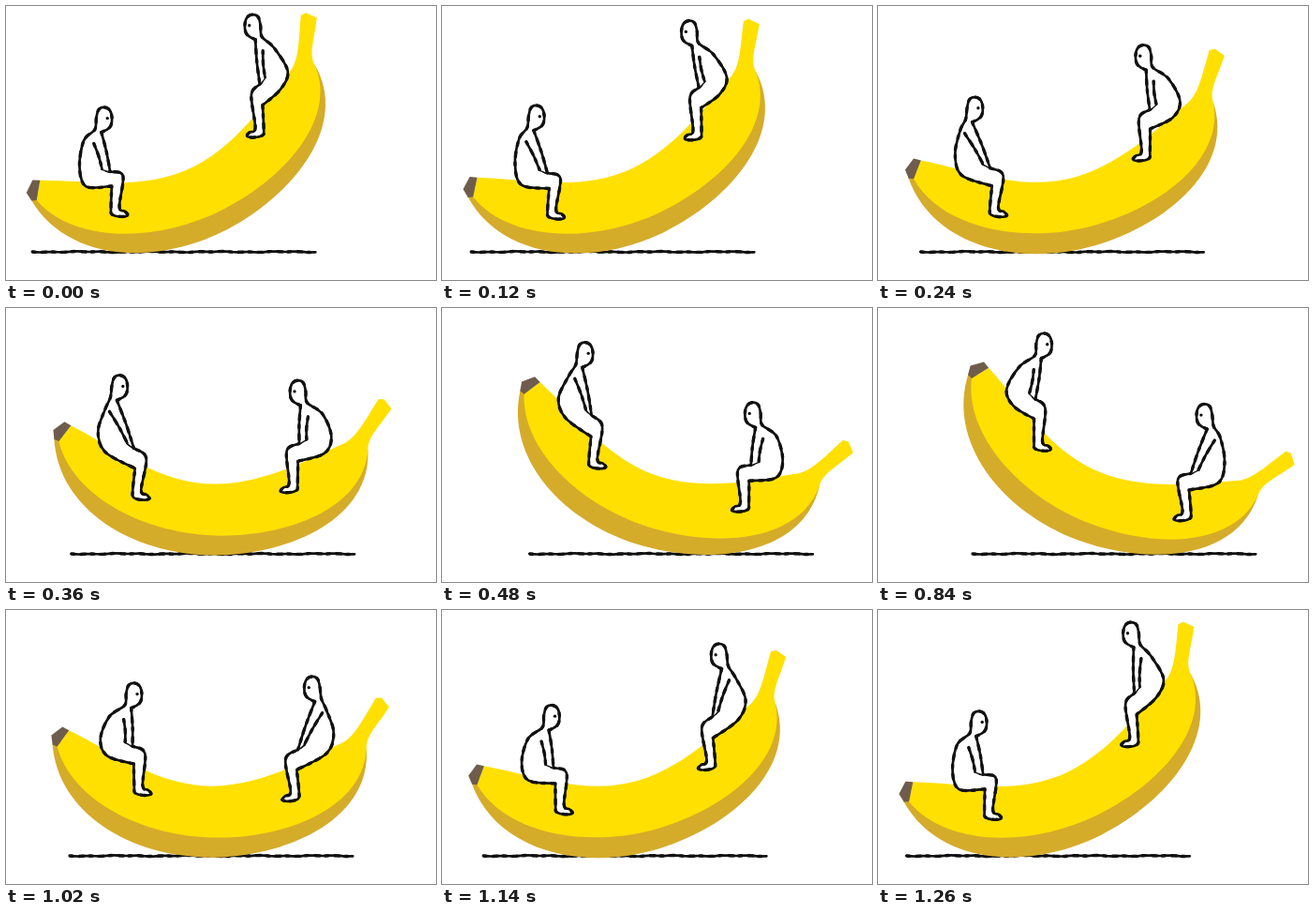
Recreate the animation shown at these times as an HTML page with a canvas. Size 459 by 292 pixels, loop 1.32 s.

```html
<!DOCTYPE html>
<html lang="en">
<head>
<meta charset="utf-8">
<title>Banana seesaw</title>
<style>
  html, body { margin: 0; width: 100%; height: 100%; overflow: hidden; background: #fff; }
  canvas { display: block; width: 459px; height: 292px; }
</style>
</head>
<body>
<canvas id="stage"></canvas>
<script>
const W = 459, H = 292, LOOP = 1320, STEP = 60, LATEST_LOW = 26;
const YELLOW = '#ffe000', SHADE = '#d5ab2a', TIP = '#6e5d4c', INK = '#111', SKIN = '#fff';
const canvas = document.getElementById('stage');
const ctx = canvas.getContext('2d');
const dpr = window.devicePixelRatio || 1;
canvas.width = W * dpr;
canvas.height = H * dpr;
ctx.scale(dpr, dpr);
ctx.lineCap = ctx.lineJoin = 'round';

// Banana outlines in its level pose, turning about PIVOT
const PIVOT = [233, 114.5];
const SHADE_PATH = new Path2D(
  'M53 139C57 213 135 263 225 263C308 262 392 222 388 150L232 225L62 136Z');
const FLESH_PATH = new Path2D(
  'M71 125C118 149 165 187 225 187C280 187 335 155 363 143C376 136 384 120 399 96' +
  'L405 96L413 106C398 128 388 136 388 150C384 210 308 242 232 242C150 242 72 200 58 142Z');
const TIP_PATH = new Path2D('M52 130L64 121L71 125L58 142L53 140Z');

// Everything follows one rocking swing: -1 leans left, 1 leans right
function rock(t) {
  const phase = (t - LATEST_LOW) / LOOP * 2 * Math.PI;
  const swing = -Math.cos(phase), speed = Math.sin(phase);
  const sway = swing * (1.12 - 0.12 * swing * swing);
  const degrees = 27 * sway - 0.4;
  return {
    swing, speed,
    angle: degrees * Math.PI / 180,
    x: 230.3 + 55 * sway,
    y: 115.3 - 0.0137 * (degrees - 3.5) ** 2,
    ground: 68 + 41 * sway
  };
}

// Screen position of a point fixed to the banana
function onBanana([x, y], pose) {
  const dx = x - PIVOT[0], dy = y - PIVOT[1];
  const cos = Math.cos(pose.angle), sin = Math.sin(pose.angle);
  return [pose.x + dx * cos - dy * sin, pose.y + dx * sin + dy * cos];
}

// Smooth curve through points, joined to the current path unless it starts one
function curve(p, start) {
  if (start) ctx.moveTo(...p[0]); else ctx.lineTo(...p[0]);
  for (let i = 0; i < p.length - 1; i++) {
    const a = p[i - 1] || p[i], b = p[i], c = p[i + 1], d = p[i + 2] || c;
    ctx.bezierCurveTo(
      b[0] + (c[0] - a[0]) / 6, b[1] + (c[1] - a[1]) / 6,
      c[0] - (d[0] - b[0]) / 6, c[1] - (d[1] - b[1]) / 6, c[0], c[1]);
  }
}

function fill(color, path) {
  ctx.fillStyle = color;
  if (path) ctx.fill(path); else ctx.fill();
}

// Brush line with a slightly uneven edge
function ink() {
  ctx.strokeStyle = INK;
  ctx.lineWidth = 2.7;
  ctx.stroke();
  ctx.lineWidth = 3.4;
  ctx.setLineDash([3, 7, 5, 6]);
  ctx.stroke();
  ctx.setLineDash([]);
}

function drawGround(pose) {
  const points = [];
  for (let i = 0; i <= 38; i++) {
    points.push([pose.ground + 1 + i * 7.95, 262 + 0.3 * Math.sin(i * 1.9) + 0.3 * Math.sin(i * 0.7)]);
  }
  ctx.beginPath();
  curve(points, true);
  ink();
}

function drawBanana(pose) {
  ctx.save();
  ctx.translate(pose.x, pose.y);
  ctx.rotate(pose.angle);
  ctx.translate(-PIVOT[0], -PIVOT[1]);
  fill(SHADE, SHADE_PATH);
  fill(YELLOW, FLESH_PATH);
  fill(TIP, TIP_PATH);
  ctx.restore();
}

// A rider sits on a banana point and faces 1 (right) or -1 (left).
// lift tells how high that end is, climb how fast it rises.
function drawRider(seatPoint, facing, pose) {
  const lift = pose.swing * facing, climb = pose.speed * facing, bend = lift * lift;
  const off = (p, x, y) => [p[0] + x * facing, p[1] + y];
  const mix = (a, b, k) => [a[0] + (b[0] - a[0]) * k, a[1] + (b[1] - a[1]) * k];

  const seat = onBanana(seatPoint, pose);
  const lean = 27.5 + 2 * lift - 8.5 * climb + 2.5 * bend;
  const height = 62 - 6.5 * lift + 2 * climb + 2.5 * bend;
  const head = off(seat, lean, -height);
  const shoulder = off(seat, 0.35 * lean - 3, 24 - height);
  const back = off(seat, -2 - 4.5 * lift - 2 * climb, -14 + 5 * lift - 2 * climb);
  const hip = off(seat, 5.5 - 4 * lift - 2 * climb, 6 + 4 * lift);
  const knee = off(seat, 47.5 - 8.5 * lift - 7 * bend, 8 + 12 * lift + 4.5 * climb - 5 * bend);
  const ankle = off(knee, -4 - 1.5 * climb, 34 + lift);
  const hand = off(mix(seat, knee, 0.72), 0, -7);
  const lap = mix(hand, knee, -9 / Math.hypot(knee[0] - hand[0], knee[1] - hand[1]));
  const neck = off(head, -3, 15), armpit = off(head, -11, 27), calf = off(knee, -12, 11);
  const arm = (from, to) => [from, off(mix(from, to, 0.5), 0.8, 0), to];

  ctx.beginPath();
  curve([
    neck, off(head, 3, 12), off(head, 7, 8), off(head, 8.3, 0), off(head, 6, -8.5),
    off(head, 0, -11.7), off(head, -6, -9), off(head, -8.5, 0), off(head, -10, 12),
    shoulder, back, hip, calf
  ], true);
  curve([
    calf, off(ankle, -9, 1), off(ankle, -8, 8), off(ankle, 2, 10.5),
    off(ankle, 9, 9), off(ankle, 6, 5), ankle, knee, hand, lap
  ]);
  fill(SKIN);
  ink();

  ctx.beginPath();
  curve(arm(neck, hand), true);
  curve(arm(armpit, lap).reverse());
  fill(SKIN);

  ctx.beginPath();
  curve(arm(neck, hand), true);
  curve(arm(armpit, lap), true);
  ink();

  ctx.beginPath();
  ctx.arc(...off(head, 3.4, 0), 1.7, 0, 2 * Math.PI);
  fill(INK);
}

function render(now) {
  const pose = rock(Math.floor(now % LOOP / STEP) * STEP);
  ctx.fillStyle = '#fff';
  ctx.fillRect(0, 0, W, H);
  drawGround(pose);
  drawBanana(pose);
  drawRider([104, 147], 1, pose);
  drawRider([349, 148], -1, pose);
}

let origin;
function tick(now) {
  if (origin === undefined) origin = now;
  render(now - origin);
  requestAnimationFrame(tick);
}
render(0);
requestAnimationFrame(tick);
</script>
</body>
</html>
```
